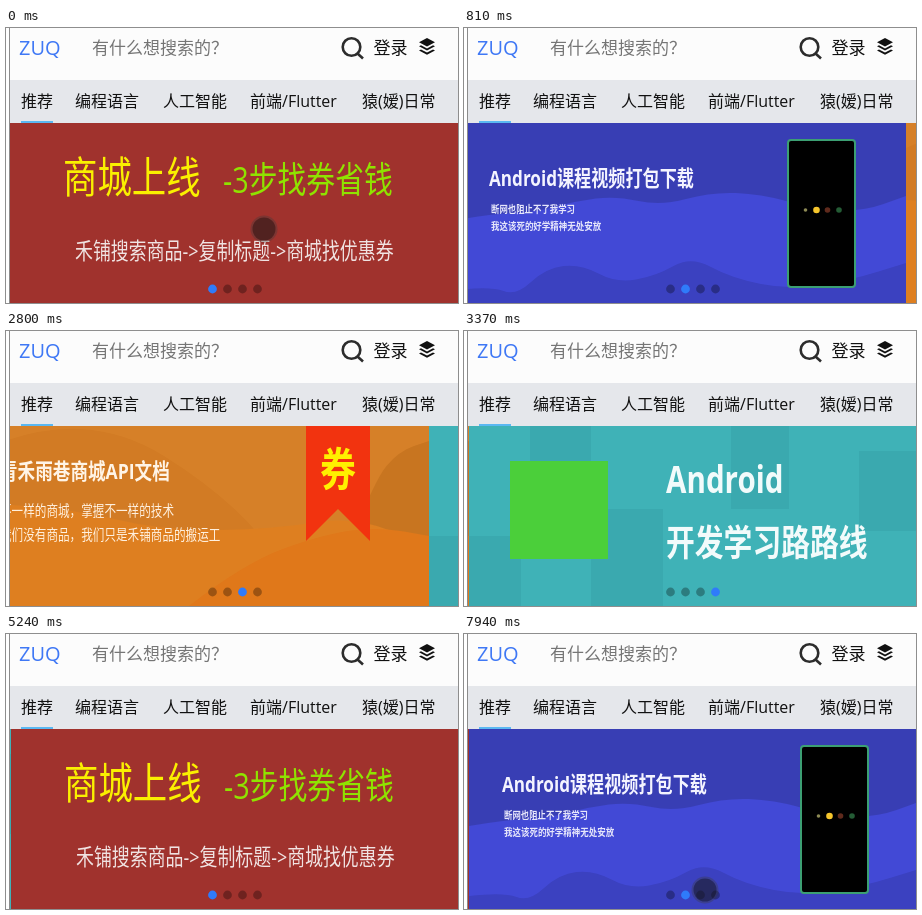
These frames come from a looping animation (452 px wide and 275 px high, 8000 ms). An HTML page with a canvas:

```html
<!DOCTYPE html>
<html lang="zh">
<head>
<meta charset="utf-8">
<title>Banner carousel</title>
<style>
html, body { margin: 0; width: 452px; height: 275px; overflow: hidden; background: #fff; }
canvas, svg { position: absolute; left: 0; top: 0; display: block; }
text { font: 16px "Open Sans", "Noto Sans CJK SC", "Noto Sans CJK", sans-serif; fill: #111; }
text.big { font-size: 17px; }
</style>
</head>
<body>
<canvas id="stage" width="452" height="275"></canvas>
<svg width="452" height="275">
  <rect width="452" height="52" fill="#fcfcfc"/>
  <rect y="52" width="452" height="43" fill="#e5e7eb"/>
  <rect width="3" height="275" fill="#fff"/>
  <rect x="3" width="1" height="275" fill="#8c8c8c"/>
  <text x="13" y="27" style="font-size:20px;fill:#3f78f5">ZUQ</text>
  <text class="big" x="86" y="25.5" style="fill:#757575">有什么想搜索的？</text>
  <g fill="none" stroke="#2c2c2c" stroke-width="2.6">
    <circle cx="345.5" cy="19" r="8.8"/>
    <path d="M351.5 25.5L357 30.5"/>
  </g>
  <text class="big" x="367.5" y="25.5">登录</text>
  <path d="M421 10l8 4.3-8 4.3-8-4.3zM413 18.2l2-1 6 3.2 6-3.2 2 1-8 4.4zM413 22.4l2-1 6 3.2 6-3.2 2 1-8 4.4z" fill="#111"/>
  <text x="15" y="79">推荐</text>
  <text x="69" y="79">编程语言</text>
  <text x="157" y="79">人工智能</text>
  <text x="244" y="79">前端/Flutter</text>
  <text x="356" y="79">猿(嫒)日常</text>
  <rect x="15" y="93" width="32" height="2" fill="#5ab8f2"/>
</svg>
<script>
const ctx = document.getElementById('stage').getContext('2d');
const LOOP = 8000, SLIDE_W = 450, TURN = 500;
const LEFT = 5, TOP = 95, BOTTOM = 275;
const FACE = '"Open Sans", "Noto Sans CJK SC", "Noto Sans CJK", sans-serif';
const SQUEEZE = 0.8; // the banners are shown narrower than they were made

const autoTurns = [803, 2782, 4757, 6731];
const RELEASE = 190;
// moments at which the picture is refreshed
const ticks = [0, 150, 270, 390, 540, 690, 810, 960, 1110, 1260, 1410,
  2800, 2950, 3070, 3220, 3370, 4810, 4960, 5110, 5240,
  6760, 6880, 7030, 7180, 7300, 7700, 7820, 7940];

function rect(x, y, w, h, color) {
  ctx.fillStyle = color;
  ctx.fillRect(x, y, w, h);
}

function disc(x, y, r, color) {
  ctx.fillStyle = color;
  ctx.beginPath();
  ctx.arc(x, y, r, 0, Math.PI * 2);
  ctx.fill();
}

function label(str, x, y, size, color, weight = 400) {
  ctx.save();
  ctx.translate(x, y);
  ctx.scale(SQUEEZE, 1);
  ctx.font = `${weight} ${size}px ${FACE}`;
  ctx.fillStyle = color;
  ctx.fillText(str, 0, 0);
  ctx.restore();
}

// Fills from a smooth curve through [x, y] points down to the bottom
function hill(pts, color) {
  const last = pts[pts.length - 1];
  ctx.fillStyle = color;
  ctx.beginPath();
  ctx.moveTo(pts[0][0], BOTTOM);
  ctx.lineTo(...pts[0]);
  for (let i = 1; i < pts.length - 1; i++) {
    const [x, y] = pts[i], [nx, ny] = pts[i + 1];
    ctx.quadraticCurveTo(x, y, (x + nx) / 2, (y + ny) / 2);
  }
  ctx.lineTo(...last);
  ctx.lineTo(last[0], BOTTOM);
  ctx.fill();
}

function shopSlide() {
  rect(LEFT - 1, TOP, SLIDE_W + 1, 180, '#a0322d');
  label('商城上线', 57, 165, 43, '#faf000');
  label('-3步找券省钱', 217, 165, 36, '#8fe300');
  label('禾铺搜索商品->复制标题->商城找优惠券', 69, 231, 22.4, '#f0e3e2');
}

function courseSlide() {
  rect(LEFT, TOP, SLIDE_W, 180, '#383eb4');
  hill([[5, 192], [40, 186], [85, 184], [125, 173], [165, 168], [210, 178],
    [260, 164], [310, 166], [360, 180], [410, 184], [455, 168]], '#4249d6');
  hill([[5, 262], [40, 258], [65, 268], [95, 240], [130, 236], [165, 255],
    [205, 248], [240, 228], [280, 250], [340, 262], [400, 252], [455, 235]], '#3b41c0');
  label('Android课程视频打包下载', 38, 158, 21.4, '#f4f4ff', 700);
  label('断网也阻止不了我学习', 40, 184.5, 10.5, '#e6e6fb', 700);
  label('我这该死的好学精神无处安放', 40, 202, 10.6, '#e6e6fb', 700);
  ctx.beginPath();
  ctx.roundRect(337, 112, 67, 147, 3);
  ctx.fillStyle = '#000';
  ctx.fill();
  ctx.strokeStyle = '#3c9f73';
  ctx.lineWidth = 2;
  ctx.stroke();
  disc(354.5, 182, 1.8, '#8d8a55');
  disc(365.5, 182, 3.3, '#f5c52c');
  disc(376.5, 182, 2.8, '#5f2a1c');
  disc(388, 182, 2.8, '#245c35');
}

function docsSlide() {
  rect(LEFT, TOP, SLIDE_W, 180, '#d68028');
  hill([[5, 120], [60, 96], [150, 100], [230, 150], [290, 205], [330, 275]], '#d27b24');
  hill([[375, 215], [400, 150], [425, 120], [455, 110]], '#c87520');
  hill([[5, 172], [90, 176], [190, 200], [300, 198], [380, 185], [455, 215]], '#de7f20');
  hill([[215, 275], [270, 232], [350, 203], [405, 196], [455, 205]], '#e0781a');
  label('青禾雨巷商城API文档', 26, 148, 22, '#fff4e6', 700);
  label('不一样的商城，掌握不一样的技术', 26, 185, 14.5, '#fff0de', 500);
  label('我们没有商品，我们只是淘货商品的搬运工'.replace('淘货', '禾铺'), 26, 209, 14.5, '#fff0de', 500);
  ctx.fillStyle = '#f2330f';
  ctx.beginPath();
  [[332, TOP], [396, TOP], [396, 210], [364, 178], [332, 210]].forEach(p => ctx.lineTo(...p));
  ctx.fill();
  label('券', 346, 155, 45, '#fff000', 700);
}

function routeSlide() {
  rect(LEFT, TOP, SLIDE_W, 180, '#3fb2b7');
  for (const [x, y, w, h] of [[66, 95, 61, 78], [267, 95, 58, 83], [127, 178, 72, 97],
    [395, 120, 60, 80], [5, 205, 52, 70]]) rect(x, y, w, h, '#3aa9af');
  rect(46, 130, 98, 98, '#4bcf3a');
  label('Android', 202, 162, 37, '#f2fbfb', 700);
  label('开发学习路路线', 202, 225, 36, '#f2fbfb', 700);
}

const slides = [shopSlide, courseSlide, docsSlide, routeSlide];

function easeOut(ms) {
  const left = 1 - Math.min(1, Math.max(0, ms / TURN));
  return 1 - left * left;
}

// Distance travelled, in slides: one swipe by hand, then timed turns
function travelled(t) {
  const pulled = 0.2 * Math.min(t / 150, 1);
  const swipe = pulled + 0.8 * easeOut(t - RELEASE);
  return autoTurns.reduce((sum, start) => sum + easeOut(t - start), swipe);
}

function pointer(x, y, alpha) {
  ctx.globalAlpha = alpha;
  disc(x, y, 13.5, 'rgba(60,60,60,.35)');
  disc(x, y, 11.5, 'rgba(0,0,0,.35)');
  ctx.globalAlpha = 1;
}

function draw(t) {
  const pos = travelled(t), first = Math.floor(pos);
  for (const i of [first - 1, first, first + 1]) {
    ctx.save();
    ctx.translate(Math.round((i - pos) * SLIDE_W), 0);
    slides[(i + 4) % 4]();
    ctx.restore();
  }
  const active = Math.round(pos) % 4;
  for (let i = 0; i < 4; i++) {
    disc(206.5 + 15 * i, 261, 4.4, i === active ? '#2f7bfa' : 'rgba(0,0,0,.3)');
  }
  if (t < RELEASE) pointer(258 - 0.6 * t, 201, 1);
  if (t >= 7700) pointer(241, 256, Math.min(1, (t - 7580) / 360));
}

let shown = -1;
function loop(now) {
  const t = now % LOOP;
  const tick = ticks.findLast(v => v <= t);
  if (tick !== shown) draw(shown = tick);
  requestAnimationFrame(loop);
}
draw(0);
requestAnimationFrame(loop);
</script>
</body>
</html>
```
